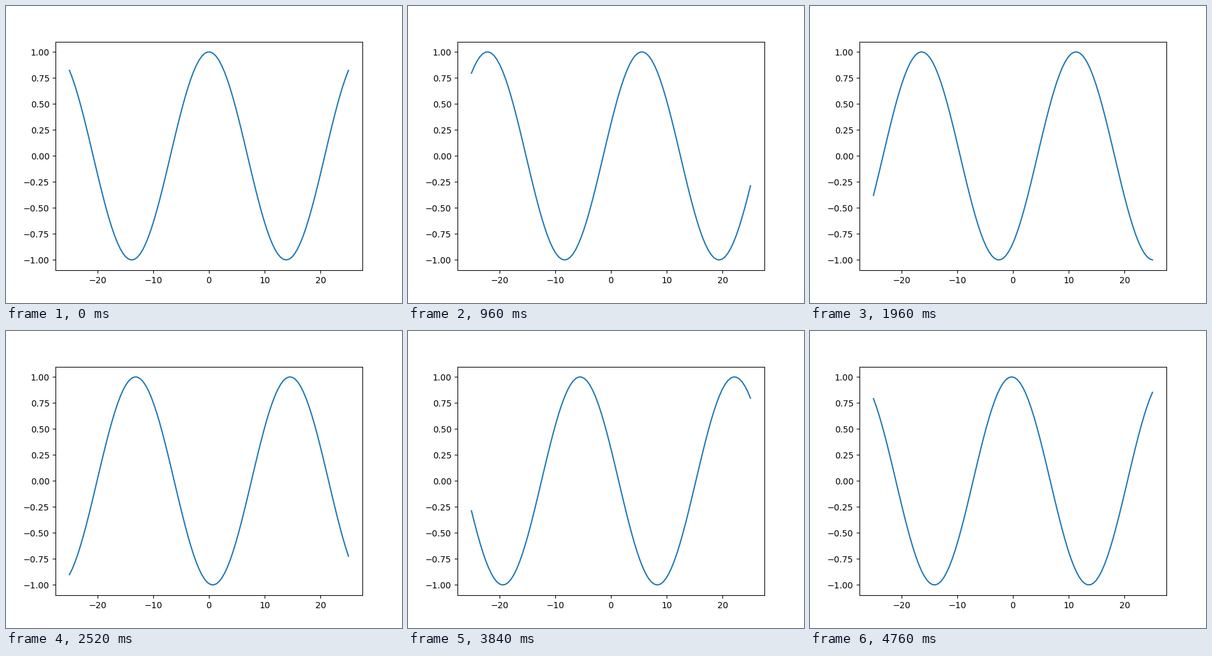
A matplotlib script for the animation above (4800 ms loop, 640x480 px).

```python
import matplotlib.pyplot as plt
import numpy as np
from matplotlib.animation import FuncAnimation

FRAMES = 120
INTERVAL = 40          # ms
WAVE_NUMBER = 0.2271

x = np.linspace(-25, 25, 100)


def wave(frame):
    """Cosine travelling right by one wavelength per loop."""
    return np.cos(WAVE_NUMBER * x - 2 * np.pi * frame / FRAMES)


fig, ax = plt.subplots(figsize=(6.4, 4.8), dpi=100)
line, = ax.plot(x, wave(0))


def update(frame):
    line.set_ydata(wave(frame))
    return line,


anim = FuncAnimation(fig, update, frames=FRAMES, interval=INTERVAL,
                     repeat=True, repeat_delay=0)
plt.show()
```
